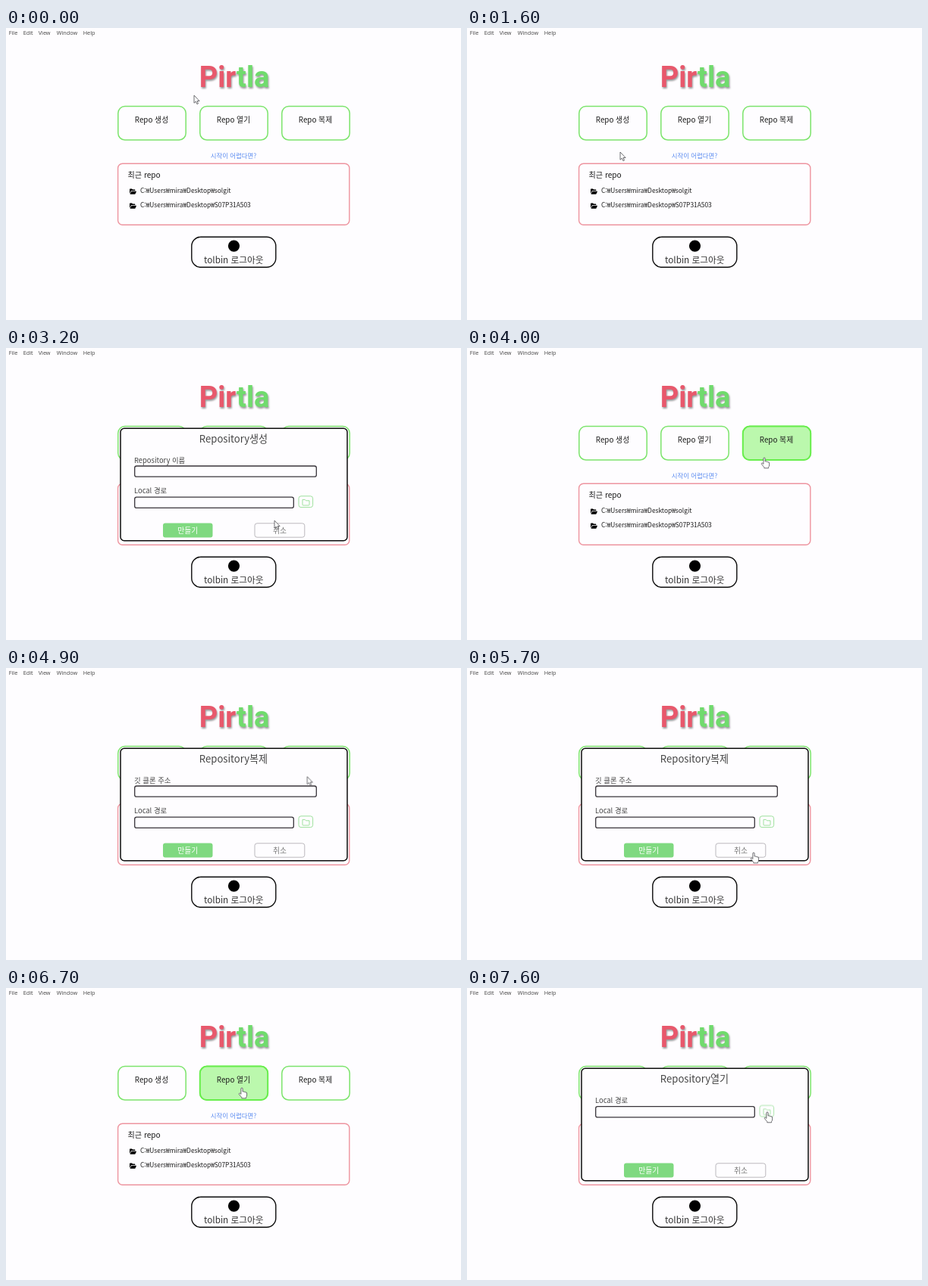
Recreate the animation shown at these times as an HTML page. Size 600 px wide and 386 px high, loop 8 s.

```html
<!DOCTYPE html>
<html lang="ko">
<head>
<meta charset="utf-8">
<title>Pirtla</title>
<style>
  html, body { margin: 0; width: 100%; height: 100%; overflow: hidden; background: #fefdff; }
  svg { display: block; width: 100vw; height: 100vh; }
  text { font-family: "Noto Sans CJK KR", "Noto Sans CJK", sans-serif; fill: #1c1c1c; }
  .mid { text-anchor: middle; }
  .menu text { font: 7.3px "Open Sans", sans-serif; fill: #444; }
  .logo { font: 700 38px Roboto, sans-serif; filter: drop-shadow(1px 2px 1px rgba(0, 0, 0, .4)); }
  .card { fill: none; stroke: #7ce46c; stroke-width: 1.5; }
  .lit { fill: #bbf8ad; stroke: #68ee4c; stroke-width: 2; }
  .name { font-size: 9.8px; font-weight: 500; }
  .path { font-size: 8.4px; }
  .label { font-size: 9.4px; fill: #444; }
  .title { font-size: 13.1px; font-weight: 300; fill: #444; }
  .login { font-size: 11.7px; font-weight: 300; fill: #333; }
  .action { font-size: 9.8px; fill: #fff; }
  .cancel { fill: #777; }
  .field { fill: #fefdff; stroke: #38343a; stroke-width: 1.3; }

  /* Everything shares one 8 s clock; switches are hard, the pointer glides. */
  .lit, .dialog, .arrow, .hand, .dim { animation: 8s step-end infinite; }
  .lit, .dialog, .hand { opacity: 0; }
  .create-lit { animation-name: create-lit; }
  .clone-lit { animation-name: clone-lit; }
  .open-lit { animation-name: open-lit; }
  .create { animation-name: create; }
  .clone { animation-name: clone; }
  .open { animation-name: open; }
  .hand { animation-name: hand; }
  .arrow { animation-name: arrow; }
  .dim { animation-name: dim; }
  .pointer { animation: glide 8s linear infinite; }

  @keyframes create-lit {
    0%, 19%, 28.75% { opacity: 0; }
    16.25%, 24.25% { opacity: 1; }
  }
  @keyframes clone-lit { 0%, 55% { opacity: 0; } 49.5% { opacity: 1; } }
  @keyframes open-lit { 0%, 86.25% { opacity: 0; } 81.25% { opacity: 1; } }
  @keyframes create { 0%, 46.25% { opacity: 0; } 28.75% { opacity: 1; } }
  @keyframes clone { 0%, 75% { opacity: 0; } 55% { opacity: 1; } }
  @keyframes open { 0% { opacity: 0; } 86.25%, 100% { opacity: 1; } }
  @keyframes hand {
    0%, 19%, 28.75%, 46.25%, 55%, 75%, 86.25% { opacity: 0; }
    16.25%, 24.25%, 41%, 49.5%, 69%, 81.25%, 93%, 100% { opacity: 1; }
  }
  @keyframes arrow {
    0%, 19%, 28.75%, 46.25%, 55%, 75%, 86.25% { opacity: 1; }
    16.25%, 24.25%, 41%, 49.5%, 69%, 81.25%, 93%, 100% { opacity: 0; }
  }
  @keyframes dim { 0% { opacity: 1; } 93%, 100% { opacity: .85; } }
  @keyframes glide {
    0%, 1% { transform: translate(248px, 89px); }
    10%, 11.5% { transform: translate(240px, 43px); }
    20%, 22.4% { transform: translate(202px, 164px); }
    25% { transform: translate(204px, 138px); }
    28.75% { transform: translate(202px, 126px); }
    32.5% { transform: translate(216px, 138px); }
    40% { transform: translate(354px, 228px); }
    42.5%, 46.25% { transform: translate(357px, 238px); }
    50% { transform: translate(392px, 145px); }
    53.75%, 60% { transform: translate(400px, 129px); }
    70%, 74% { transform: translate(378px, 244px); }
    83.75%, 87% { transform: translate(311px, 132px); }
    94%, 100% { transform: translate(396px, 164px); }
  }
</style>
</head>
<body>
<svg viewBox="0 0 600 386">
  <defs>
    <rect id="card" x=".8" y="103.6" width="89.4" height="44.4" rx="9"/>
    <path id="folder" d="M0 7.2V1.2Q0 .4 .8 .4H3L4 1.4H6.6Q7.3 1.4 7.3 2.2V3H2.6Q2 3 1.7 3.5ZM.5 7.8 2.3 4.1Q2.5 3.7 3 3.7H8.6Q9.2 3.7 8.9 4.3L7.5 7.3Q7.2 7.8 6.7 7.8Z"/>
    <g id="frame">
      <rect x="151" y="106.3" width="299" height="148.4" rx="5" fill="#fefdff" stroke="#0c0c0c" stroke-width="1.5"/>
      <rect x="207" y="231.5" width="65.5" height="19" rx="3" fill="#7fd980"/>
      <text class="action mid" x="239.7" y="244.6">만들기</text>
      <rect x="328" y="231.8" width="65.8" height="18.4" rx="3" fill="#fefdff" stroke="#b4b2b6" stroke-width=".9"/>
      <text class="action cancel mid" x="361" y="244.6">취소</text>
    </g>
    <rect id="wide" class="field" x="169.7" y="156" width="239.6" height="14.2" rx="2.5"/>
    <g id="local">
      <text class="label" x="169" y="192">Local 경로</text>
      <rect class="field" x="169.7" y="197.2" width="209.6" height="14.2" rx="2.5"/>
    </g>
    <g id="browse" fill="none" stroke="#93de92" stroke-width=".9">
      <rect x="386" y="195.8" width="18.6" height="14.8" rx="3"/>
      <path d="M391 207.2V200.4H394.3L395.4 201.8H400V207.2Q400 208 399.2 208H391.8Q391 208 391 207.2Z"/>
    </g>
  </defs>

  <g class="menu">
    <text x="3.7" y="8.6">File</text>
    <text x="22.7" y="8.6">Edit</text>
    <text x="42.7" y="8.6">View</text>
    <text x="66.7" y="8.6">Window</text>
    <text x="101.7" y="8.6">Help</text>
  </g>

  <text class="logo mid" x="301" y="78"><tspan fill="#e8586c">Pir</tspan><tspan fill="#70db6d">tla</tspan></text>

  <g transform="translate(147)">
    <use href="#card" class="card"/>
    <use href="#card" class="lit create-lit"/>
    <text class="name mid" x="45" y="125">Repo 생성</text>
  </g>
  <g transform="translate(255)">
    <use href="#card" class="card"/>
    <use href="#card" class="lit open-lit"/>
    <text class="name mid" x="45" y="125">Repo 열기</text>
  </g>
  <g transform="translate(363)">
    <use href="#card" class="card"/>
    <use href="#card" class="lit clone-lit"/>
    <text class="name mid" x="45" y="125">Repo 복제</text>
  </g>

  <text class="mid" x="300" y="172.3" font-size="8.4" style="fill:#5b8cf0">시작이 어렵다면?</text>

  <rect x="147.6" y="179.2" width="305.2" height="81" rx="6" fill="none" stroke="#ee949f" stroke-width="1.4"/>
  <text x="160.5" y="198.3" font-size="10.1">최근 repo</text>
  <use href="#folder" x="163" y="212"/>
  <text class="path" x="177" y="218.2">C:₩Users₩mira₩Desktop₩solgit</text>
  <use href="#folder" x="163" y="231"/>
  <text class="path" x="177" y="237">C:₩Users₩mira₩Desktop₩S07P31A503</text>

  <rect x="244.8" y="276.3" width="111" height="40" rx="12" fill="none" stroke="#0c0c0c" stroke-width="1.4"/>
  <circle cx="300.5" cy="288.1" r="7.6"/>
  <text class="login mid" x="300.3" y="310.6">tolbin 로그아웃</text>

  <g class="dialog create">
    <use href="#frame"/>
    <text class="title mid" x="300" y="125.1">Repository생성</text>
    <text class="label" x="169" y="152">Repository 이름</text>
    <use href="#wide"/>
    <use href="#local"/>
    <use href="#browse"/>
  </g>
  <g class="dialog clone">
    <use href="#frame"/>
    <text class="title mid" x="300" y="125.1">Repository복제</text>
    <text class="label" x="169" y="152">깃 클론 주소</text>
    <use href="#wide"/>
    <use href="#local"/>
    <use href="#browse"/>
  </g>
  <g class="dialog open">
    <use href="#frame"/>
    <text class="title mid" x="300" y="125.1">Repository열기</text>
    <use href="#local" y="-40.5"/>
    <use href="#browse" y="-40.5" class="dim"/>
  </g>

  <g class="pointer" fill="#fff" stroke="#4a4a4e" stroke-width=".8" stroke-linejoin="round">
    <path class="arrow" d="M0 0V10.2L2.3 8.1 3.9 11.6 5.5 10.9 4 7.5H7.1Z"/>
    <path class="hand" d="M-1.1 1Q-1 0 0 0T1.1 1V5Q2.4 4.4 3 5.4 4.3 4.9 4.8 5.9 6.4 5.5 6.6 7V10Q6.4 11.6 5.6 12.4V13.8H-.2V12.6L-3.6 8.6Q-4.2 7.5 -3.2 7.1 -2.4 6.9 -1.1 8.4Z"/>
  </g>
</svg>
</body>
</html>
```
